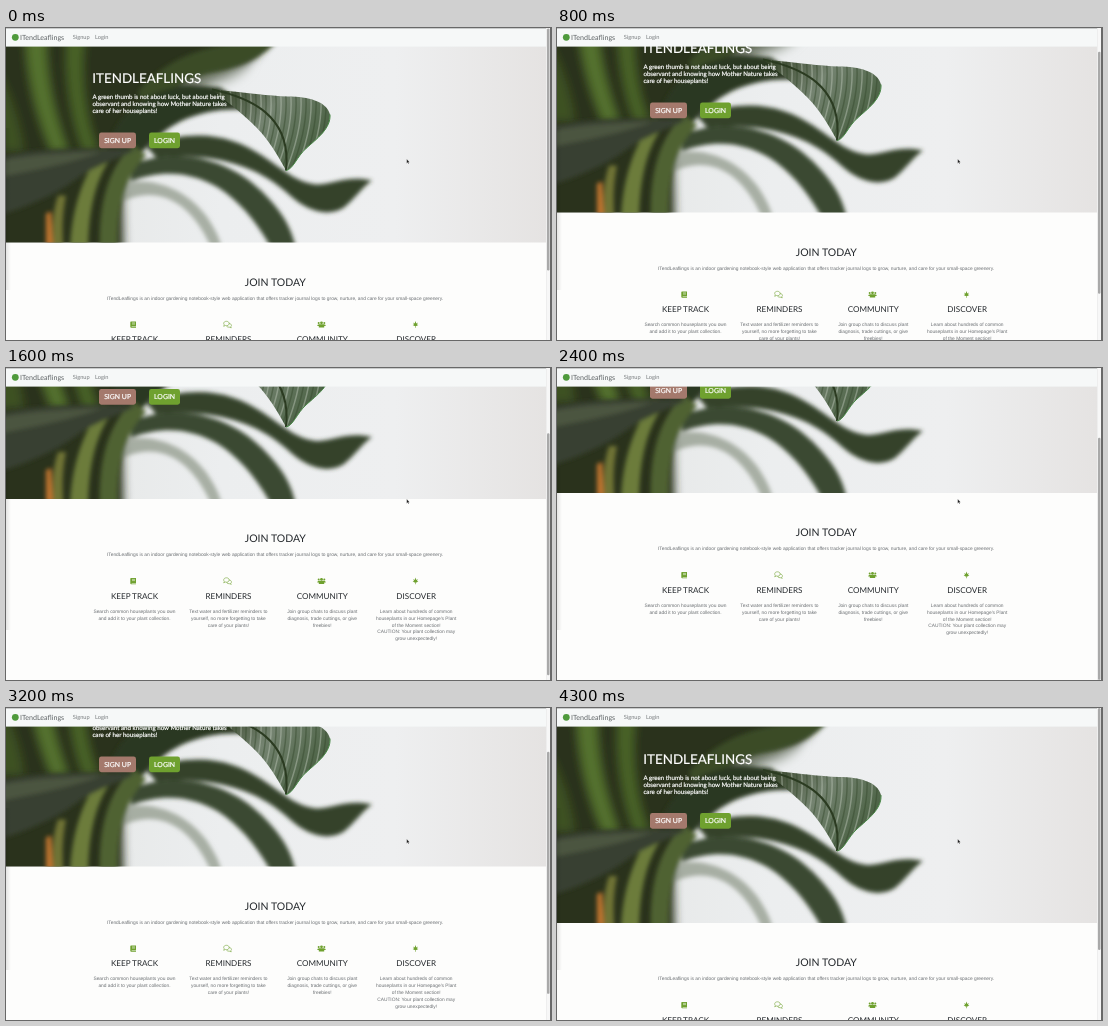
Animation, 545 px wide and 312 px high, one loop 4400 ms. Source, as an HTML page:

```html
<!DOCTYPE html>
<html lang="en">
<head>
<meta charset="utf-8">
<title>ITendLeaflings</title>
<style>
  html, body { margin: 0; width: 100%; height: 100%; overflow: hidden; background: #fdfdfc; }
  svg { display: block; width: 100%; height: 100%; }
  text { font-family: Lato, sans-serif; text-rendering: geometricPrecision; }
  .mid { text-anchor: middle; }
  .copy { font: 4.85px "Liberation Sans", Arial, sans-serif; fill: #6b6f73; }
  .head { font-size: 8.1px; fill: #25292d; }
  .icon { fill: #6fa12f; }
  .hero text { fill: #fff; stroke: #fff; stroke-width: .2; }
</style>
</head>
<body>
<svg viewBox="0 0 545 312" preserveAspectRatio="none">
  <defs>
    <linearGradient id="wall">
      <stop offset="0" stop-color="#e3e5e4"/>
      <stop offset=".4" stop-color="#eceeef"/>
      <stop offset=".72" stop-color="#eeeff0"/>
      <stop offset="1" stop-color="#e5e3e2"/>
    </linearGradient>
    <linearGradient id="blade" x1="0" y1="0" x2="1" y2=".5">
      <stop offset="0" stop-color="#303d22"/>
      <stop offset=".5" stop-color="#748370"/>
      <stop offset="1" stop-color="#4a6143"/>
    </linearGradient>
    <linearGradient id="edge">
      <stop offset="0" stop-color="#000" stop-opacity=".16"/>
      <stop offset="1" stop-color="#000" stop-opacity="0"/>
    </linearGradient>
    <filter id="far" x="-20%" y="-20%" width="140%" height="140%"><feGaussianBlur stdDeviation="5"/></filter>
    <filter id="near" x="-20%" y="-20%" width="140%" height="140%"><feGaussianBlur stdDeviation="2"/></filter>
    <filter id="sharp" x="-20%" y="-20%" width="140%" height="140%"><feGaussianBlur stdDeviation=".6"/></filter>
    <clipPath id="photo"><rect width="540" height="215"/></clipPath>
    <clipPath id="leaf"><path id="leafShape" d="M206 62C232 64 256 68 282 69C302 69 321 74 324 87C325 101 311 111 300 121C291 129 287 142 280 143C275 134 267 119 256 106C244 92 226 78 206 62Z"/></clipPath>
  </defs>

  <rect width="545" height="312" fill="#fdfdfc"/>
  <g id="page">
    <g clip-path="url(#photo)">
      <rect y="-10" width="540" height="226" fill="url(#wall)"/>
      <g filter="url(#far)">
        <path d="M-20 0H268C260 24 240 42 212 52C186 62 168 84 152 106C138 122 122 128 116 150L118 240H-20Z" fill="#29331a"/>
        <path d="M20 0H40C38 46 48 86 62 124H46C30 86 20 46 20 0Z" fill="#55722f"/>
        <path d="M62 0H80C72 40 78 90 92 124H78C64 90 58 40 62 0Z" fill="#4a6328"/>
        <path d="M-10 40C6 70 14 96 18 124H-10Z" fill="#3d5124"/>
        <path d="M170 60C190 40 222 34 246 36C240 50 222 58 200 62Z" fill="#a9afa5" opacity=".6"/>
      </g>
      <g filter="url(#near)">
        <path d="M132 64C160 32 196 14 270 14C258 30 228 42 202 46C176 52 156 66 140 84Z" fill="#3b4c26"/>
        <path d="M102 116C120 70 160 52 214 60L250 84C206 76 160 92 132 128Z" fill="#2c3720"/>
        <path d="M140 118C190 100 226 108 256 128C280 144 292 156 312 157C330 156 342 148 366 153C356 160 348 172 338 180C322 190 302 184 284 168C256 142 214 124 150 130Z" fill="#34432a"/>
        <path d="M128 136C176 118 226 134 256 164C276 184 286 200 290 222H266C252 196 234 174 212 160C184 144 156 142 124 154Z" fill="#3b4930"/>
        <path d="M112 156C148 148 180 162 200 188C208 200 214 210 216 222H206C194 194 176 172 150 168C136 166 124 170 112 176Z" fill="#7c8573" opacity=".6"/>
        <path d="M94 230C92 186 98 142 128 118L140 128C118 150 110 180 112 230Z" fill="#4f6230"/>
        <path d="M64 230C64 190 74 150 98 120L108 126C88 152 82 186 82 230Z" fill="#6c7c3a"/>
        <path d="M48 230C46 200 46 186 52 168L60 168C56 190 56 204 58 230Z" fill="#707335"/>
        <path d="M-8 130C16 122 72 120 130 122C112 132 88 138 70 152C48 168 20 180-8 188Z" fill="#394130"/>
        <path d="M-8 134C30 126 60 126 96 124C66 136 30 142-8 150Z" fill="#4b543f"/>
        <path d="M40 186L45 184L47 218H40Z" fill="#c0742f"/>
      </g>
      <g filter="url(#sharp)">
        <use href="#leafShape" fill="url(#blade)"/>
        <g id="veins" clip-path="url(#leaf)" fill="none" stroke-width="1.5"></g>
        <path d="M206 62C244 70 286 88 280 143" fill="none" stroke="#2b3b21" stroke-width="2"/>
        <path d="M324 87C325 101 311 111 300 121C291 129 287 142 280 143" fill="none" stroke="#4a8a48" stroke-width="1"/>
      </g>
    </g>

    <g class="hero">
      <text x="86.3" y="55.7" font-size="13.4">ITENDLEAFLINGS</text>
      <g id="intro" font-size="6.2"></g>
      <rect x="93" y="105" width="37" height="15.7" rx="2.4" fill="#a4796c"/>
      <rect x="143" y="105" width="31" height="15.7" rx="2.4" fill="#6fa12f"/>
      <text class="mid" x="111.6" y="115.4" font-size="6.9">SIGN UP</text>
      <text class="mid" x="158.6" y="115.4" font-size="6.9">LOGIN</text>
    </g>

    <text class="mid" x="269.3" y="258" font-size="10.5" fill="#25292d">JOIN TODAY</text>
    <text class="mid copy" x="269" y="272.2">ITendLeaflings is an indoor gardening notebook-style web application that offers tracker journal logs to grow, nurture, and care for your small-space greenery.</text>

    <g class="icon">
      <path d="M125 294H130V299H125.6V299.5H130V300.2H125.2Q124.3 300.2 124.3 299.3V294.8Q124.3 294 125 294Z"/>
      <path d="M126 295.4H129M126 296.6H129" stroke="#fff" stroke-width=".5"/>
      <g fill="#fdfdfc" stroke="#6fa12f" stroke-width=".6">
        <path d="M222 296C226 295.6 226 299 224.6 299.3L225.3 300.3L223.3 299.7C222 299.8 221.2 299.4 220.8 298.8Z"/>
        <path d="M220.5 293.8C224 293.8 224 298.2 220.5 298.2L219.4 298L217.7 298.8L218.3 297.3C217 296 217.8 293.8 220.5 293.8Z"/>
      </g>
      <circle cx="312.7" cy="295.4" r="1"/><circle cx="318.3" cy="295.4" r="1"/><circle cx="315.5" cy="295.3" r="1.4"/>
      <path d="M311.2 298.6Q311.2 296.8 313.2 296.8H317.8Q319.8 296.8 319.8 298.6H318.2V300H312.8V298.6Z"/>
      <path d="M409.5 293.6L410.3 296L411.8 295L411 297L412.4 297.6L410.4 298.6L409.8 298.5V300.3H409.2V298.5L408.6 298.6L406.6 297.6L408 297L407.2 295L408.7 296Z"/>
    </g>
    <g id="columns"></g>
  </g>

  <rect y="100" width="5" height="162" fill="url(#edge)" opacity=".6"/>
  <rect width="545" height="18.6" fill="#f6f8f8"/>
  <rect width="545" height=".8" fill="#bfc1c1"/>
  <circle cx="9.3" cy="9.3" r="3.4" fill="#4f9a3c"/>
  <text x="14" y="11.6" font-size="7.1" fill="#5d6264">ITendLeaflings</text>
  <g font-size="5.7" fill="#777b7d">
    <text x="66.8" y="11.1">Signup</text>
    <text x="89" y="11.1">Login</text>
  </g>

  <rect x="540" width="5" height="312" fill="#f7f7f7"/>
  <rect x="540" width=".5" height="312" fill="#e4e4e4"/>
  <rect id="thumb" x="541" y=".5" width="2.5" height="242" rx="1.2" fill="#a9a9a9"/>
  <rect x="544" width="1" height="312" fill="#6a6a6a"/>
  <path d="M400.7 131V135.5L401.7 134.6L402.4 136L403 135.7L402.4 134.3L403.6 134.2Z" fill="#111" stroke="#fff" stroke-width=".3"/>
</svg>

<script>
const $ = id => document.getElementById(id);

function add(parent, tag, attrs, content = "") {
  const el = document.createElementNS("http://www.w3.org/2000/svg", tag);
  for (const [key, value] of Object.entries(attrs)) el.setAttribute(key, value);
  el.textContent = content;
  parent.append(el);
}

function addLines(parent, lines, x, y, step, className = "") {
  lines.forEach((line, i) => add(parent, "text", { x, y: y + i * step, class: className }, line));
}

addLines($("intro"), [
  "A green thumb is not about luck, but about being",
  "observant and knowing how Mother Nature takes",
  "care of her houseplants!"
], 86.4, 71.6, 6.95);

const columns = [
  ["KEEP TRACK", "Search common houseplants you own", "and add it to your plant collection."],
  ["REMINDERS", "Text water and fertilizer reminders to", "yourself, no more forgetting to take", "care of your plants!"],
  ["COMMUNITY", "Join group chats to discuss plant", "diagnosis, trade cuttings, or give", "freebies!"],
  ["DISCOVER", "Learn about hundreds of common", "houseplants in our Homepage's Plant", "of the Moment section!", "CAUTION: Your plant collection may", "grow unexpectedly!"]
];
columns.forEach(([title, ...lines], i) => {
  const x = 128.5 + i * 93.9;
  add($("columns"), "text", { x, y: 314.8, class: "mid head" }, title);
  addLines($("columns"), lines, x, 328.6, 6.95, "mid copy");
});

// Pale and dark stripes across the variegated leaf
for (let i = 0; i < 26; i++) {
  const x = 208 + i * 5;
  add($("veins"), "path", {
    d: `M${x} 56Q${x + 8} 92 ${x - 14} 146`,
    stroke: i % 2 ? "#bcc6b8" : "#33482a",
    opacity: 0.45
  });
}

// Time in ms, scroll distance in px
const scrollSteps = [
  [0, .5], [100, 1], [300, 6], [400, 10], [600, 20.5], [800, 30.5], [1200, 60],
  [1400, 74], [1600, 84], [1800, 89.7], [1900, 90], [2500, 90], [2700, 86], [3000, 71],
  [3200, 56.5], [3500, 30], [3700, 15], [3900, 5], [4100, 1], [4200, 0], [4400, 0]
];
const loop = 4400, frame = 100;

function scrollAt(time) {
  const next = scrollSteps.findIndex(([t]) => t > time);
  const [t0, y0] = scrollSteps[next - 1], [t1, y1] = scrollSteps[next];
  return y0 + (y1 - y0) * (time - t0) / (t1 - t0);
}

const start = performance.now();
function draw() {
  const elapsed = (performance.now() - start) % loop;
  const y = scrollAt(Math.floor(elapsed / frame) * frame);
  $("page").setAttribute("transform", `translate(0 ${-y})`);
  $("thumb").setAttribute("y", y * 312 / 402);
  requestAnimationFrame(draw);
}
draw();
</script>
</body>
</html>
```
